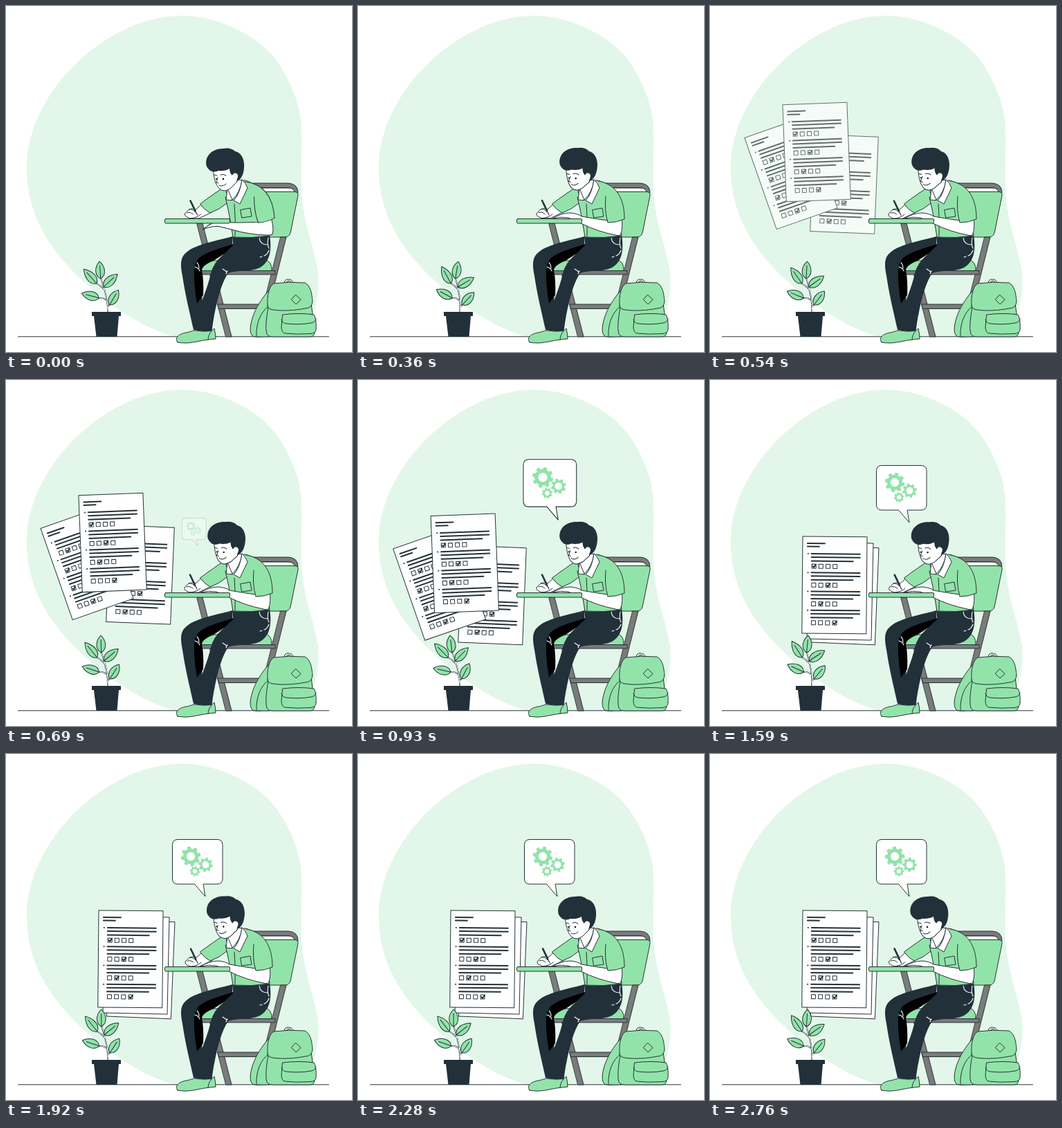
Recreate the animation shown at these times as an HTML page. Size 500x500 px, loop 2790 ms.

```html
<!DOCTYPE html>
<html lang="en">
<head>
<meta charset="utf-8">
<title>Student at work</title>
<style>
html, body { margin: 0; width: 100%; height: 100%; overflow: hidden; background: #fff; }
svg { display: block; width: 100vw; height: 100vh; }
.ink { stroke: #263238; stroke-width: 1; stroke-linejoin: round; stroke-linecap: round; }
.green { fill: #92e3a9; }
.white { fill: #fff; }
.dark { fill: #22303a; }
.grey { fill: #7b7b7b; }
.line { fill: none; }
.chalk { fill: none; stroke: #fff; stroke-width: 1.1; stroke-linecap: round; }
</style>
</head>
<body>
<svg viewBox="0 0 500 500">
  <path fill="#e2f7e9" d="M255 14C300 14 348 36 376 62C398 83 422 126 426 165C430 205 424 235 428 280C433 325 446 350 451 385C454 420 445 460 420 478L242 478C198 464 152 435 112 398C62 352 30 300 30 235C30 165 75 95 140 52C175 28 215 14 255 14Z"/>
  <path class="ink" d="M17.500 477.800H466.500"/>

  <g id="papers"></g>

  <g id="plant">
    <path id="stemEdge" fill="none" stroke="#263238" stroke-width="1.900"/>
    <path id="stemCore" fill="none" stroke="#fff" stroke-width=".9"/>
    <g id="leaves"></g>
  </g>
  <path class="dark" d="M124 442H166V448H163L160.500 478H130.500L127 448H124Z"/>

  <g id="bubble">
    <path class="ink white" d="M248 123.500H305Q313 123.500 313 131.500V180Q313 188 305 188H285L288 206L272.500 188H248Q240.500 188 240.500 180V131.500Q240.500 123.500 248 123.500Z"/>
    <g id="gears"></g>
  </g>

  <!-- chair -->
  <g class="ink">
    <path class="white" d="M362 263H412Q419 264 417 272L372 273Z"/>
    <path class="grey" d="M357 256H408Q422 257 422 270L418 272Q417 263 408 262.500H361Z"/>
    <path class="green" d="M372 268.500H415Q423 268 422 274L411 328Q409 334 403 334H370Z"/>
    <path class="grey" d="M397 334H405L369 478H361Z"/>
    <path class="grey" d="M276 314H284L326 478H318Z"/>
    <path class="grey" d="M306 431H373L371 437.500H308Z"/>
    <path class="green" d="M286 383Q279 382 283 376Q288 369 300 368L372 366Q385 368 384 383Z"/>
    <path class="grey" d="M279 382.500H389V388H279Z"/>
  </g>

  <!-- backpack -->
  <g class="ink">
    <path class="green" d="M380 411C368 424 354 446 353 467Q353 479 362 478H380L379 430Z"/>
    <path class="line" d="M379 434C368 442 361 459 362 477"/>
    <path class="line" d="M402 400Q403 394.500 408 395Q414 395 415 400M404.500 400Q406 397 409 397.500Q412 398 412.500 400"/>
    <path class="green" d="M380 430C377 445 374 465 377 474Q379 478 386 478H440Q447 477 446 468L441 430Z"/>
    <path class="green" d="M378 433C377 418 380 405 387 401Q410 398 432 400C440 404 442 415 443 427Q442 437 432 437C418 440 398 441 386 439Q378 438 378 433Z"/>
    <path class="line" d="M419 417.500L426 424.500L419 431L412.500 424.500Z"/>
    <path class="green" d="M400 446Q424 443 445 446Q449 452 448 468Q447 473 440 473.500Q420 475 403 473Q398 472 398 464Z"/>
    <path class="line" d="M398 453Q399 458 405 459Q425 461 441 458Q447 457 448 452"/>
  </g>

  <!-- legs -->
  <path class="dark" d="M327 333C310 338 275 344 262 355C251 363 252 374 255 390C259 418 266 445 271 468L284 430L280 370L327 350Z"/>
  <path d="M328 344C312 350 293 353 279 364C271 372 272 384 272 396Q273 414 276 430L285 418Q286 396 283 382Q283 375 300 368L328 350Z"/>
  <path class="dark" d="M327 333L381 331C384 350 383 369 367 378C352 385 335 381 321 386C310 402 302 435 297.500 470Q284 471 271 468C275 440 291 412 296 386Q300 371 312 361L328 346Z"/>
  <path class="chalk" d="M276 371Q279 374 279 379M273 377Q278 378 280 383M313 380L319 384M318 387Q319 384 320 383M366 335Q367 345 378 345M379 335Q377 344 380 350M380 353Q378 359 373 361M370 362L367 363"/>
  <g class="ink">
    <path class="green" d="M248 486C243 479 250 474 260 472C267 471 271 468 274 469Q286 471 297 469.500L301 466Q303 474 303 481C285 482 271 487 260 487Q252 487 248 486Z"/>
    <path class="line" d="M297 470Q292 475 292 482.500"/>
  </g>

  <!-- writing arm -->
  <g id="hand" class="ink">
    <path class="white" d="M283 286L274 294Q268 291.500 264 294L258 300Q257 303 261 305L266 307H278L297 298Z"/>
    <path class="line" d="M264 294Q270 293 273 298M261 299Q266 297 270 301M266 307Q276 306 281 301"/>
    <path d="M266 281.500L273 296" stroke-width="2.600"/>
    <path d="M273 296L276 302" stroke-width="1.200"/>
  </g>

  <!-- torso -->
  <g class="ink">
    <path class="green" d="M318 260Q302 270 280.500 286Q286 294 295 299Q309 294 319 285Q322 298 324 310L328 334Q355 336 381 332L378 300C378 275 362 255 345 252Z"/>
    <path class="line" d="M319 285L317 276M330 286Q332 308 331 333M339 294.500L353 292L355 304L341 306Z"/>
    <path class="white" d="M323 262L332 250L341 252Q338 270 327 280Q320 275 318 268Z"/>
    <path class="white" d="M341 251Q347 256 349 263L338 286L329 281Q338 272 341 251ZM320 264L318 280L327 281Z"/>
  </g>

  <g id="head">
    <path class="ink white" d="M299 234C300 246 302 258 309 264.500Q316 270 325 263L334 254L336 232Z"/>
    <path class="dark" d="M290 232C286 217 298 206 314 206Q325 204 331 210C342 212 346 226 343.500 238Q342 249 333 254Q337 246 333 242Q329 240 327 245Q323 241 323 235Q316 239 307 238Q296 243 290 232Z"/>
    <path class="white" d="M327 245Q331 239 335 244Q336 251 329 252Z"/>
    <path class="ink line" d="M310 244Q314 242 318 245M301 244L305 245M306 248L304 255L307 256M308 259Q313 262 318 257"/>
    <circle cx="314" cy="250" r="1.200"/>
    <circle cx="304" cy="250" r="1"/>
  </g>

  <!-- resting arm -->
  <g id="arm" class="ink">
    <path id="forearm" class="white" d="M281 307Q294 299 307 299Q318 300 323 304Q345 308 361 310L381 305Q383 320 380 329Q379 333 372 331Q346 326 322 314L304 306Q292 304 281 307Z"/>
    <path class="green" stroke="none" d="M349 254C372 258 385 276 385 308Q374 313 361 313Q356 296 358 275Z"/>
    <path class="line" d="M346 252.500C372 257 385 276 385 308Q374 313 361 313Q356 296 358 275"/>
  </g>

  <rect class="ink green" x="229.500" y="307.500" width="94" height="6.500" rx="1.500"/>
</svg>
<script>
const LOOP = 2790, STEP = 30;
const $ = id => document.getElementById(id);

function make(tag, parent, attrs) {
  const el = document.createElementNS('http://www.w3.org/2000/svg', tag);
  for (const k in attrs) el.setAttribute(k, attrs[k]);
  return parent.appendChild(el);
}

const ease = u => u * u * (3 - 2 * u);
const mix = (a, b, u) => a + (b - a) * u;
const span = (t, a, b) => Math.min(1, Math.max(0, (t - a) / (b - a)));

// Eased value of a [time, value] list
function track(keys, t) {
  let i = 1;
  while (i < keys.length - 1 && t > keys[i][0]) i++;
  const [a, va] = keys[i - 1], [b, vb] = keys[i];
  return mix(va, vb, ease(span(t, a, b)));
}

// Sheets: fanned and stacked centre and angle, back to front; turn is [start, end]
const sheets = [
  { fan: [194, 310.9, 2.3], stack: [194.7, 310.9, 2.3], turn: [900, 1440], ticks: [0, 2, 3, 1] },
  { fan: [117, 294.7, -19.3], stack: [188, 305, 1.2], turn: [900, 1440], ticks: [1, 0, 0, 2] },
  { fan: [154.1, 264.5, -2.2], stack: [179.9, 296.4, .5], turn: [1200, 1530], ticks: [0, 2, 1, 3] }
];

for (const s of sheets) {
  const g = s.el = make('g', $('papers'), {});
  make('rect', g, { class: 'ink white', x: -46.5, y: -70, width: 93, height: 140 });
  const page = make('g', g, { transform: 'translate(-46.5 -70)' });
  let text = 'M7 10h25M7 14.500h17', boxes = '', ticks = '';
  s.ticks.forEach((tick, row) => {
    const y = 25 + row * 27.2;
    text += `M8 ${y}h.1M13 ${y}h70M13 ${y + 5}h70M13 ${y + 10.500}h60`;
    for (let i = 0; i < 4; i++) boxes += `M${13.500 + i * 10.2} ${y + 15}h6v6h-6z`;
    ticks += `M${14.800 + tick * 10.2} ${y + 18}l1.500 1.800l3.200 -4.300`;
  });
  make('path', page, { d: text, class: 'ink', style: 'stroke-width:2' });
  make('path', page, { d: boxes, class: 'ink line' });
  make('path', page, { d: ticks, class: 'ink line', style: 'stroke-width:1.900' });
}

// Leaves: base x, base y, length, angle from upright
const leaves = [
  [132, 401, 28, -38], [138, 394, 25, 0], [142, 406, 27, 51],
  [135, 422, 26, -71], [150, 432, 25, 34]
].map(([x, y, len, angle]) => {
  const el = make('g', $('leaves'), { class: 'ink' });
  make('path', el, { class: 'green', d: `M0 0C-9 -5 -8 -17 0 ${-len}C8 -17 9 -5 0 0Z` });
  make('path', el, { class: 'line', d: `M0 0V${-len * .75}` });
  return { x, y, angle, el };
});

function gearPath(r, hole) {
  const teeth = 8, root = r * .78, pts = [];
  for (let i = 0; i < teeth; i++) {
    for (const [off, rad] of [[-.30, root], [-.21, r], [.21, r], [.30, root]]) {
      const a = (i + off) / teeth * Math.PI * 2;
      pts.push(`${(rad * Math.cos(a)).toFixed(2)} ${(rad * Math.sin(a)).toFixed(2)}`);
    }
  }
  return `M${pts.join('L')}ZM${hole} 0A${hole} ${hole} 0 1 0 ${-hole} 0A${hole} ${hole} 0 1 0 ${hole} 0Z`;
}

const gears = [[267, 148, 14.4, 6.2, 1], [288.5, 160, 10.4, 5, -1], [273, 169.5, 7.4, 3.2, -1]]
  .map(([x, y, r, hole, dir]) => ({
    x, y, dir,
    el: make('path', $('gears'), { class: 'green', 'fill-rule': 'evenodd', d: gearPath(r, hole) })
  }));

const sway = [[0, -1.5], [360, 3.5], [690, -.5], [1080, -3.6], [1200, -3.3], [1650, 2.3],
  [2050, -1], [2280, .1], [2450, -.8], [2760, 1.6], [2790, 1.2]];
const nod = [[0, 0], [360, .95], [800, 1], [1200, .97], [1590, .75], [2280, 0], [2790, .1]];
const pop = [[570, .15], [690, .48], [870, 1.08], [1050, 1]];
const fade = [[600, 0], [690, .35], [870, 1]];

function drawPapers(t) {
  const drop = -76 * (1 - span(t, 410, 930)) ** 1.22;
  const gather = ease(span(t, 900, 1440));
  $('papers').setAttribute('opacity', span(t, 410, 600));
  for (const { fan, stack, turn, el } of sheets) {
    const x = mix(fan[0], stack[0], gather), y = mix(fan[1], stack[1], gather) + drop;
    const angle = mix(fan[2], stack[2], ease(span(t, ...turn)));
    el.setAttribute('transform', `translate(${x} ${y}) rotate(${angle})`);
  }
}

function drawPlant(t) {
  const s = track(sway, t);
  const at = (x, y) => `${x + s * .7 * (443 - y) / 43} ${y}`;
  const d = `M147 442C${at(148, 425)} ${at(144, 410)} ${at(138, 393)}` +
    `M${at(143, 410)}Q${at(138, 404)} ${at(132, 401)}M${at(143, 411)}L${at(142, 406)}` +
    `M${at(147, 427)}Q${at(142, 421)} ${at(135, 422)}M147 438Q${at(147, 433)} ${at(150, 432)}`;
  $('stemEdge').setAttribute('d', d);
  $('stemCore').setAttribute('d', d);
  for (const { x, y, angle, el } of leaves)
    el.setAttribute('transform', `translate(${at(x, y)}) rotate(${angle + 2.6 * s})`);
}

function drawBubble(t) {
  const k = track(pop, t);
  $('bubble').setAttribute('opacity', track(fade, t));
  $('bubble').setAttribute('transform', `translate(267 270) scale(${k}) translate(-267 -270)`);
  for (const { x, y, dir, el } of gears)
    el.setAttribute('transform', `translate(${x} ${y}) rotate(${dir * 180 * t / LOOP})`);
}

function drawStudent(t) {
  const low = 1 - ease(span(t, 0, 240));
  $('head').setAttribute('transform', `rotate(${3.4 * track(nod, t)} 333 262)`);
  $('arm').setAttribute('transform', `rotate(${-4.5 * low} 366 268)`);
  $('forearm').setAttribute('transform', `rotate(${-5.5 * low} 380 320)`);
  const w = t / LOOP * Math.PI * 2;
  $('hand').setAttribute('transform', `translate(${.5 - .6 * Math.sin(w)} ${.3 * Math.sin(6 * w)})`);
}

function frame() {
  const t = Math.floor(performance.now() % LOOP / STEP) * STEP;
  drawPapers(t);
  drawPlant(t);
  drawBubble(t);
  drawStudent(t);
  requestAnimationFrame(frame);
}
frame();
</script>
</body>
</html>
```
